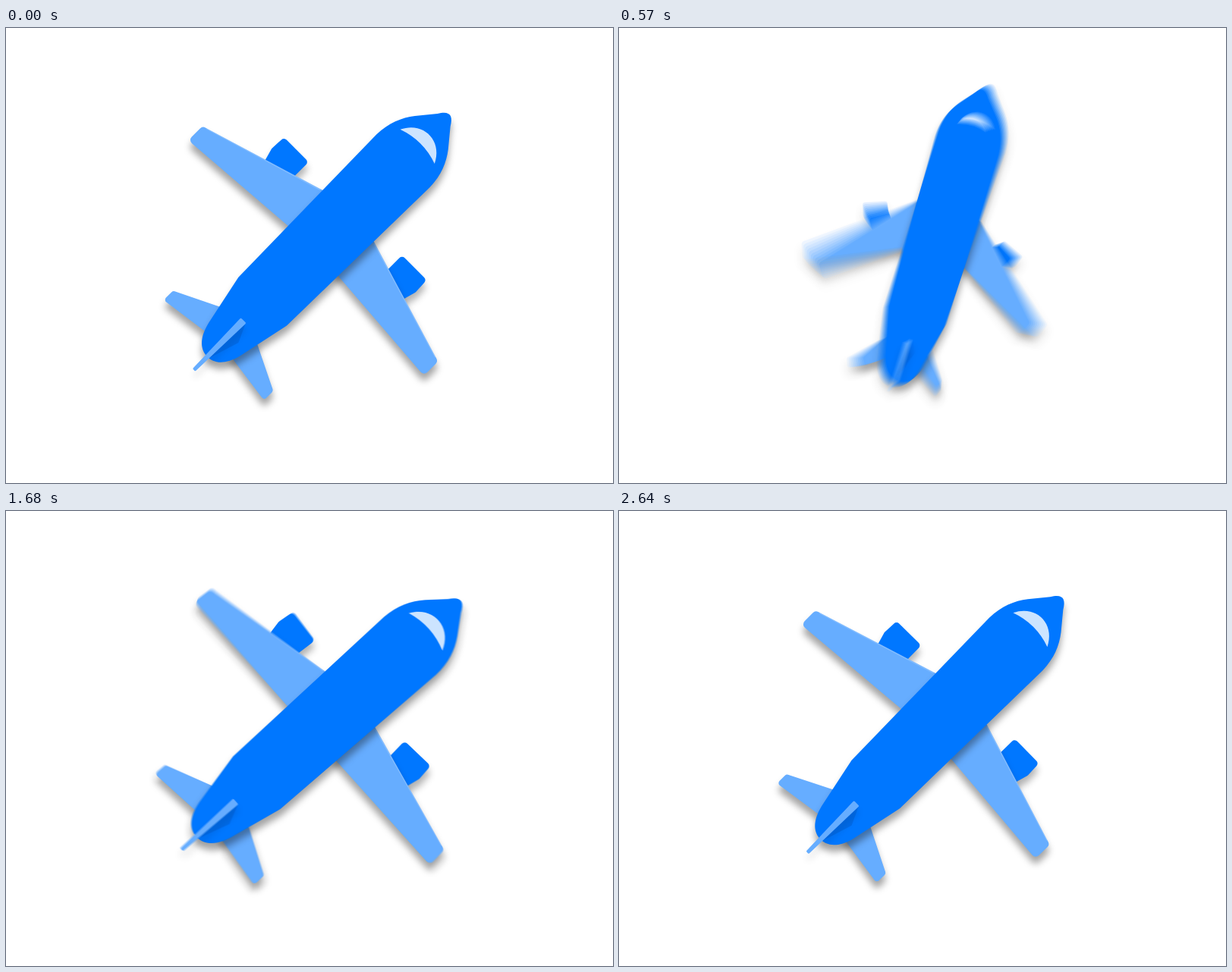
Write an HTML page with a canvas that moves like this. It is 800 px wide and 600 px high and loops after 2670 ms.

```html
<!DOCTYPE html>
<html lang="en">
<head>
<meta charset="utf-8">
<title>Plane</title>
<style>
  html, body { margin: 0; width: 100%; height: 100%; overflow: hidden; background: #fff; }
  canvas { display: block; }
</style>
</head>
<body>
<canvas id="stage" width="800" height="600"></canvas>
<script>
const W = 800, H = 600;
const LOOP = 2670, STEP = 30, MIRROR = 2070, SHUTTER = 16, SAMPLES = 10;
const BLUE = '#0077ff', SKY = '#66adff', PALE = '#cce4ff';

const out = document.getElementById('stage').getContext('2d');
const layer = document.createElement('canvas');
layer.width = W;
layer.height = H;
const ctx = layer.getContext('2d');

// Shapes point up, with the middle of the fuselage at 0,0
const body = new Path2D(
  'M-12-217C-4-231 4-231 12-217L31-194C42-180 49-163 49.5-141L45 121' +
  'L30 192C24 216 12 224 0 224S-24 216-30 192L-45 121L-49.5-141' +
  'C-49-163-42-180-31-194Z');
const glass = new Path2D('M-32-167.6C-18-197 18-197 32-167.6Q0-179-32-167.6Z');
const finShade = new Path2D('M5 158L16 182L3 224L0 224Z');
const wing = rounded([[-30, -44], [-219.5, 13.5], [-219.5, 40], [-30, 25.5]], 6);
const wingEdge = new Path2D('M-50-37L-213 12');
const engine = rounded([[-133, -52], [-87, -52], [-87, -15], [-127, -5], [-134, -30]], 5);
const tail = rounded([[-15, 156], [-93.5, 194.5], [-93.5, 212], [-15, 201]], 4);
const fin = rounded([[-5, 156.5], [5, 156.5], [2.5, 249], [-2.5, 249]], 1.5);

function rounded(pts, r) {
  const p = new Path2D(), n = pts.length;
  const [a, b] = [pts[n - 1], pts[0]];
  p.moveTo((a[0] + b[0]) / 2, (a[1] + b[1]) / 2);
  pts.forEach((c, i) => p.arcTo(...c, ...pts[(i + 1) % n], r));
  p.closePath();
  return p;
}

const rad = deg => deg * Math.PI / 180;
const span = (a, b, t) => Math.min(1, Math.max(0, (t - a) / (b - a)));
const smooth = x => x * x * (3 - 2 * x);
const smoother = x => x * x * x * (x * (6 * x - 15) + 10);
const easeOut = x => 1 - (1 - x) ** 3;

// The arrival is the departure played backwards
const mirrored = t => t < MIRROR / 2 ? t : Math.max(0, MIRROR - t);

// Wind up, then turn upright, shrink and fold the wings back
function pose(t) {
  const u = mirrored(t);
  const wind = smooth(span(300, 450, u));
  const rest = span(1700, 1850, t) * (1 - 0.4 * span(1850, LOOP, t));
  return {
    turn: 5 * wind - 50 * easeOut(span(455, 840, u)),
    size: (1 + 0.054 * wind) * (1 - smoother(span(465, 840, u))) - 0.003 * rest,
    sweep: 7 * wind - 105 * smooth(span(480, 720, u)) - 0.8 * rest
  };
}

function part(path, color, shadow) {
  ctx.shadowColor = shadow ? `rgba(0,0,0,${shadow})` : 'transparent';
  ctx.fillStyle = color;
  ctx.fill(path);
}

// Draws with a turn and a scale around one point
function hinge(x, y, deg, size, draw) {
  ctx.save();
  ctx.translate(x, y);
  ctx.rotate(rad(deg));
  ctx.scale(size, size);
  ctx.translate(-x, -y);
  draw();
  ctx.restore();
}

function drawWing(side, sweep, tuck) {
  ctx.save();
  ctx.scale(side, 1);
  hinge(-48, -37, sweep, 1 - 0.16 * tuck, () => {
    hinge(-105, 10, 0, 1 - tuck, () => part(engine, BLUE, 0.3));
    part(wing, SKY, 0.36);
    ctx.shadowColor = 'transparent';
    ctx.strokeStyle = 'rgba(255,255,255,.18)';
    ctx.lineWidth = 1.5;
    ctx.stroke(wingEdge);
  });
  hinge(-36, 166, sweep * (sweep > 0 ? 0.4 : 1), 1 - 0.9 * tuck,
    () => part(tail, SKY, 0.36));
  ctx.restore();
}

function drawPlane({ turn, size, sweep }) {
  ctx.fillStyle = '#fff';
  ctx.fillRect(0, 0, W, H);
  if (size < 0.001) return;
  const tuck = span(0, -105, Math.min(0, sweep));
  const depth = Math.min(1, size * 1.6);
  ctx.save();
  ctx.translate(423.7, 275);
  ctx.rotate(rad(45 + turn));
  ctx.scale(size, size);
  ctx.shadowOffsetY = 9 * depth;
  ctx.shadowBlur = 10 * depth;
  drawWing(1, sweep, tuck);
  drawWing(-1, sweep, tuck);
  part(body, BLUE, 0.36);
  hinge(0, -168, 0, 1 - tuck, () => part(glass, PALE));
  hinge(0, 165, 0, 1 - tuck, () => {
    part(finShade, 'rgba(0,30,90,.13)');
    part(fin, SKY, 0.1);
  });
  ctx.restore();
}

// Averages several moments of one exposure for motion blur
function render(t) {
  const n = mirrored(t) < 250 ? 1 : SAMPLES;
  for (let i = 0; i < n; i++) {
    drawPlane(pose(t + SHUTTER * ((i + 0.5) / n - 0.5)));
    out.globalAlpha = 1 / (i + 1);
    out.drawImage(layer, 0, 0);
  }
}

let start = null, shown = -1;
function tick(now) {
  if (start === null) start = now;
  const step = Math.floor(((now - start) % LOOP) / STEP);
  if (step !== shown) {
    shown = step;
    render(step * STEP);
  }
  requestAnimationFrame(tick);
}
render(0);
requestAnimationFrame(tick);
</script>
</body>
</html>
```
